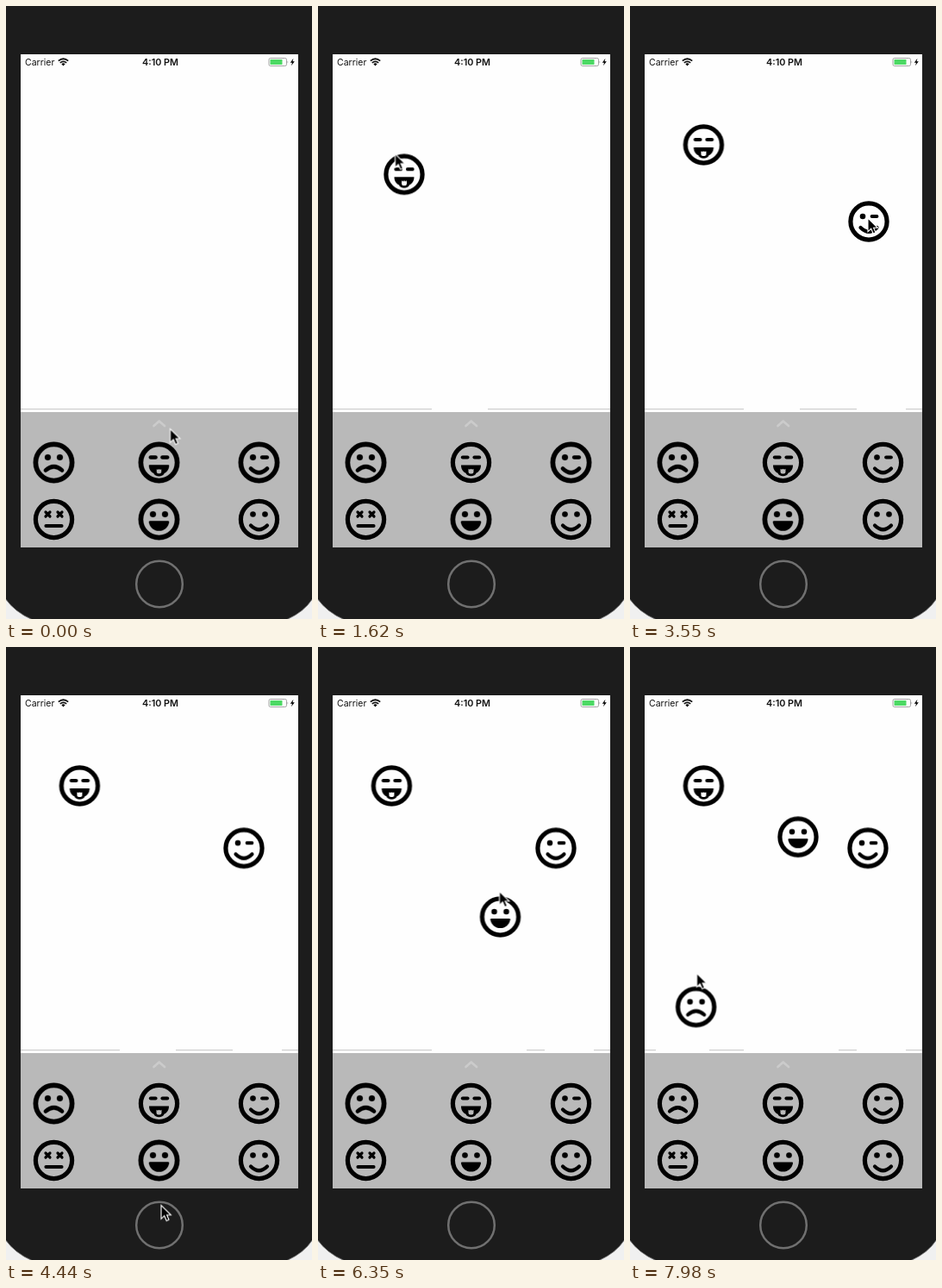
Animation, 355 px wide and 711 px high, one loop 8 s. Source, as an HTML page:

```html
<!DOCTYPE html>
<html lang="en">
<head>
<meta charset="utf-8">
<title>Emoji tray</title>
<style>
html, body { margin: 0; width: 100%; height: 100%; overflow: hidden; background: #1c1c1c; }
svg { display: block; width: 355px; height: 711px; }
text { font-family: Inter, Roboto, sans-serif; fill: #111; }
.line { fill: none; stroke: #000; stroke-width: 4.2; stroke-linecap: round; }
.move, .gap { animation: 8s step-end infinite; }
.gap { fill: #fefefe; opacity: 0; }
#tongue { animation-name: tongue; }
#wink { animation-name: wink; }
#grin { animation-name: grin; }
#sad { animation-name: sad; }
#cursor { animation-name: cursor; }
#gap1 { animation-name: gap1; }
#gap2 { animation-name: gap2; }
#gap3 { animation-name: gap3; }
#gap4 { animation-name: gap4; }

@keyframes gap1 { 0% { opacity: 0 } 16.5%, 100% { opacity: 1 } }
@keyframes gap2 { 0% { opacity: 0 } 40.5%, 100% { opacity: 1 } }
@keyframes gap3 { 0% { opacity: 0 } 72%, 100% { opacity: 1 } }
@keyframes gap4 { 0% { opacity: 0 } 96%, 100% { opacity: 1 } }

@keyframes tongue {
  0% { transform: translate(177.5px, 529.5px) }
  14.75% { transform: translate(173px, 488px) }
  16.5% { transform: translate(156px, 446px) }
  18.375% { transform: translate(121px, 290px) }
  20.25% { transform: translate(100px, 195.3px) }
  22% { transform: translate(88px, 166px) }
  23.875% { transform: translate(86px, 161px) }
  38.75%, 100% { transform: translate(85.4px, 161px) }
}
@keyframes wink {
  0% { transform: translate(293.5px, 529.5px) }
  38.75% { transform: translate(296px, 488px) }
  40.5% { transform: translate(287px, 446px) }
  42.375% { transform: translate(282px, 330px) }
  44.25% { transform: translate(277px, 250px) }
  46.25%, 100% { transform: translate(276px, 233.3px) }
}
@keyframes grin {
  0% { transform: translate(177.5px, 595.5px) }
  66.375% { transform: translate(185px, 573px) }
  68.25% { transform: translate(200px, 535px) }
  70.125% { transform: translate(212.6px, 495.5px) }
  72% { transform: translate(218px, 446px) }
  73.875% { transform: translate(215px, 400px) }
  77.5% { transform: translate(213px, 345px) }
  79.375% { transform: translate(211.5px, 313px) }
  81.125% { transform: translate(203px, 255px) }
  83% { transform: translate(195px, 222px) }
  84.875%, 100% { transform: translate(195px, 220.3px) }
}
@keyframes sad {
  0% { transform: translate(55.5px, 529.5px) }
  94.25% { transform: translate(53px, 515px) }
  96% { transform: translate(54px, 485px) }
  97.875% { transform: translate(68px, 448px) }
  99.75%, 100% { transform: translate(76.6px, 417.5px) }
}
@keyframes cursor {
  0% { transform: translate(190.5px, 490.5px) }
  1.875% { transform: translate(185px, 503px) }
  3.625% { transform: translate(174px, 517px) }
  5.5% { transform: translate(170px, 522px) }
  14.75% { transform: translate(168px, 472px) }
  16.5% { transform: translate(150px, 420px) }
  18.375% { transform: translate(112px, 262px) }
  20.25% { transform: translate(89.5px, 171.5px) }
  22% { transform: translate(78px, 152px) }
  23.875% { transform: translate(76px, 149px) }
  29.5% { transform: translate(100px, 200px) }
  31.25% { transform: translate(200px, 400px) }
  33.125% { transform: translate(284px, 525px) }
  35% { transform: translate(294px, 541.5px) }
  38.75% { transform: translate(296px, 492px) }
  40.5% { transform: translate(287px, 438px) }
  42.375% { transform: translate(281px, 322px) }
  44.25% { transform: translate(276px, 246px) }
  46.25% { transform: translate(275px, 238px) }
  49.875% { transform: translate(250px, 335px); opacity: 1 }
  51.75% { transform: translate(180px, 648px); opacity: 0 }
  55.5% { transform: translate(180px, 647.5px); opacity: 1 }
  57.375% { transform: translate(179px, 632px) }
  59.125% { transform: translate(178px, 615px) }
  61% { transform: translate(177px, 604px) }
  62.75% { transform: translate(177px, 601px) }
  66.375% { transform: translate(187px, 572px) }
  68.25% { transform: translate(203px, 524px) }
  70.125% { transform: translate(214.5px, 478px) }
  72% { transform: translate(219px, 424px) }
  73.875% { transform: translate(216px, 376px) }
  77.5% { transform: translate(213px, 318px) }
  79.375% { transform: translate(210.5px, 283.5px) }
  81.125% { transform: translate(200px, 228px) }
  83% { transform: translate(190px, 205px) }
  84.875% { transform: translate(189px, 204px) }
  86.625% { transform: translate(130px, 400px) }
  88.5% { transform: translate(60px, 575px) }
  90.5% { transform: translate(56px, 571px) }
  92.375% { transform: translate(54px, 540px) }
  94.25% { transform: translate(57px, 497px) }
  96% { transform: translate(62px, 455px) }
  97.875% { transform: translate(71px, 412px) }
  99.75%, 100% { transform: translate(77.5px, 378.5px) }
}
</style>
</head>
<body>
<svg viewBox="0 0 355 711">
  <defs>
    <circle id="ring" r="21.1" fill="none" stroke="#000" stroke-width="5.2"/>
    <circle id="eye" cy="-6" r="3.3"/>
    <path id="dash" class="line" d="M-2.8-6H2.8"/>
    <path id="cross" class="line" style="stroke-width:3.2" d="M-2.5-8.5L2.5-3.5M2.5-8.5L-2.5-3.5"/>
    <path id="smile" class="line" d="M-9.5 7Q0 16.5 9.5 7"/>
    <g id="eyes"><use href="#eye" x="-7"/><use href="#eye" x="7"/></g>

    <g id="sadFace">
      <use href="#ring"/><use href="#eyes"/>
      <path class="line" d="M-9.5 9Q0 .5 9.5 9"/>
    </g>
    <g id="tongueFace">
      <use href="#ring"/><use href="#dash" x="-6.8"/><use href="#dash" x="6.8"/>
      <path fill-rule="evenodd" d="M-11.5 3H11.5C11.5 8 9 11 6 12.3C5 16.8-5 16.8-6 12.3C-9 11-11.5 8-11.5 3Z
        M-3 7.2V10.5A3 2.6 0 0 0 3 10.5V7.2Q1.5 8.6 0 7.2Q-1.5 8.6-3 7.2Z"/>
    </g>
    <g id="winkFace">
      <use href="#ring"/><use href="#eye" x="-7"/><use href="#dash" x="6.5"/><use href="#smile"/>
    </g>
    <g id="deadFace">
      <use href="#ring"/><use href="#cross" x="-7"/><use href="#cross" x="7"/>
      <path class="line" d="M-9 7.5H9"/>
    </g>
    <g id="grinFace">
      <use href="#ring"/><use href="#eyes"/>
      <path d="M-10.5 2H10.5Q11.7 2 11.5 3.2C10.3 9.5 5.8 13 0 13S-10.3 9.5-11.5 3.2Q-11.7 2-10.5 2Z"/>
    </g>
    <g id="smileFace"><use href="#ring"/><use href="#eyes"/><use href="#smile"/></g>
  </defs>

  <!-- phone body -->
  <rect width="355" height="711" fill="#1c1c1c"/>
  <g fill="#f0f0f0" stroke="#777" stroke-width=".8">
    <path d="M-1 687Q10 703 31 712H-1Z"/>
    <path d="M356 687Q346 703 325 712H356Z"/>
  </g>
  <circle cx="178" cy="670.5" r="26.8" fill="none" stroke="#707070" stroke-width="2.5"/>

  <!-- screen -->
  <rect x="17" y="56" width="322" height="572" fill="#fefefe"/>
  <rect x="17" y="467" width="322" height="1" fill="#c9c9c9"/>
  <rect x="17" y="471" width="322" height="157" fill="#b9b9b9"/>
  <path d="M171.5 487L177.7 481.5L184 487" fill="none" stroke="#cbcbcb" stroke-width="2.8" stroke-linecap="round" stroke-linejoin="round"/>

  <!-- status bar -->
  <text x="22" y="68.6" font-size="10.5">Carrier</text>
  <text x="179" y="68.6" font-size="10.8" font-weight="600" text-anchor="middle">4:10 PM</text>
  <g fill="none" stroke="#111" stroke-width="1.7">
    <path d="M60.8 63.7Q66.5 58.8 72.2 63.7"/>
    <path d="M62.8 65.9Q66.5 62.7 70.2 65.9"/>
  </g>
  <path d="M64.4 67.2Q66.5 65.5 68.6 67.2L66.5 69.4Z"/>
  <rect x="305" y="60.5" width="20.5" height="9" rx="1.8" fill="none" stroke="#a4a4a4"/>
  <rect x="306.5" y="62" width="14" height="6" rx=".5" fill="#4cd964"/>
  <path d="M326.5 63.5Q328.3 65 326.5 66.5Z" fill="#a4a4a4"/>
  <path d="M333.4 60.8L329.8 65.7H332L331 69.2L334.8 64.2H332.5Z"/>

  <!-- line segments wiped by passing faces -->
  <rect id="gap1" class="gap" x="132" y="466" width="65" height="5"/>
  <rect id="gap2" class="gap" x="263" y="466" width="57" height="5"/>
  <rect id="gap3" class="gap" x="197" y="466" width="45" height="5"/>
  <rect id="gap4" class="gap" x="30" y="466" width="62" height="5"/>

  <!-- tray -->
  <use href="#sadFace" x="55.5" y="529.5"/>
  <use href="#tongueFace" x="177.5" y="529.5"/>
  <use href="#winkFace" x="293.5" y="529.5"/>
  <use href="#deadFace" x="55.5" y="595.5"/>
  <use href="#grinFace" x="177.5" y="595.5"/>
  <use href="#smileFace" x="293.5" y="595.5"/>

  <!-- dragged copies -->
  <g id="tongue" class="move"><use href="#tongueFace"/></g>
  <g id="wink" class="move"><use href="#winkFace"/></g>
  <g id="grin" class="move"><use href="#grinFace"/></g>
  <g id="sad" class="move"><use href="#sadFace"/></g>

  <g id="cursor" class="move">
    <path d="M0 0V15.8L3.7 12.3L6.2 18L9 16.8L6.6 11.3H11.4Z" stroke="#fff" stroke-width="1.1"/>
  </g>
</svg>
</body>
</html>
```
